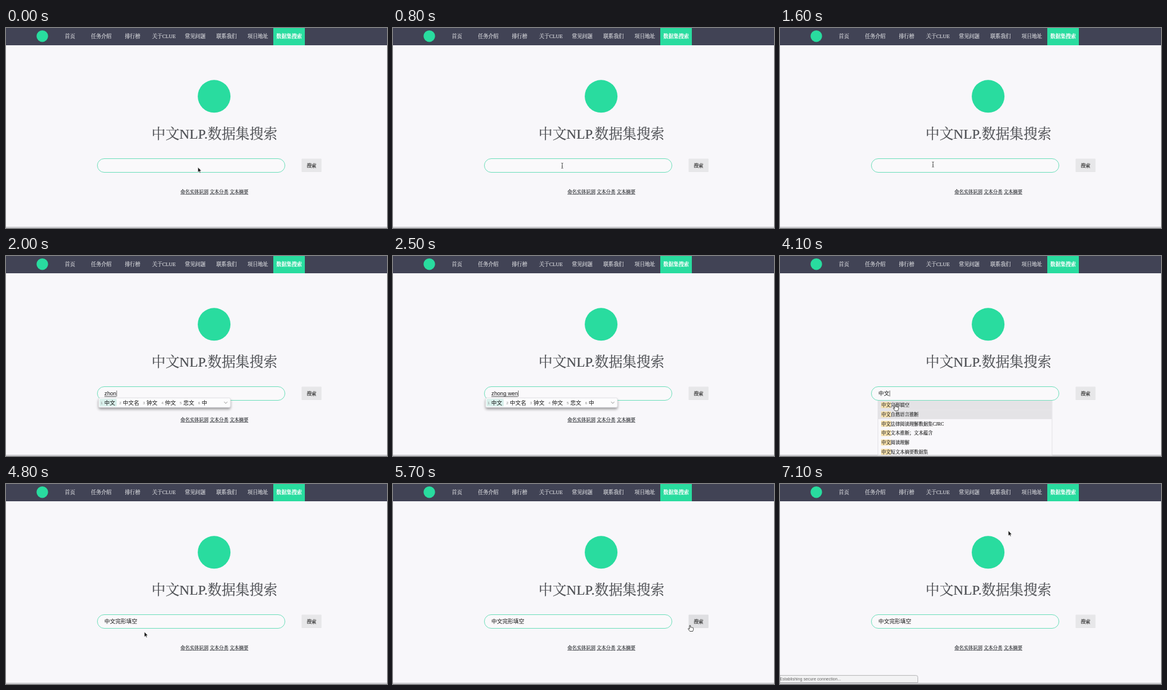
These frames come from a looping animation (640x336 px, 8 s). An HTML page:

```html
<!DOCTYPE html>
<html lang="zh-CN">
<head>
<meta charset="utf-8">
<title>数据集搜索</title>
<style>
  html, body { margin: 0; width: 100%; height: 100%; overflow: hidden; background: #f8f7fa; }
  svg { display: block; width: 100vw; height: 100vh; }
  text { white-space: pre; }
  .serif { font-family: "Liberation Serif", "Noto Serif CJK SC", "Noto Sans CJK SC", serif; fill: currentColor; }
  .sans { font-family: "Liberation Sans", "Noto Sans CJK SC", sans-serif; }
  /* a hairline outline gives the serif text a medium weight */
  text.serif, .serif text { fill: currentColor; stroke: currentColor; stroke-width: .22; }
  .mid { text-anchor: middle; }
</style>
</head>
<body>
<svg id="stage" viewBox="0 0 640 336">
  <defs>
    <filter id="shadow" x="-10%" y="-50%" width="120%" height="250%">
      <feDropShadow dx="0" dy="3" stdDeviation="2.2" flood-color="#000" flood-opacity=".38"/>
    </filter>
  </defs>
  <rect width="640" height="336" fill="#f8f7fa"/>
  <rect width="640" height="29" fill="#414355"/>
  <rect x="449" width="53" height="29" fill="#29dc9f"/>
  <circle cx="61" cy="13.7" r="9.7" fill="#29dc9f"/>
  <g id="nav" class="serif mid" font-size="8.6" color="#d6d7db"></g>

  <circle cx="349.6" cy="114.8" r="27.5" fill="#29dc9f"/>
  <text class="serif" x="244.6" y="186" font-size="23.4" color="#505256">中文NLP.数据集搜索</text>
  <g id="links" class="serif" font-size="7.85" color="#33363a"></g>

  <rect id="button" x="496.5" y="219.5" width="33.5" height="22.5" rx="1" fill="#e7e7e9"/>
  <text class="serif mid" x="513.2" y="233.8" font-size="8" color="#333">搜索</text>
  <rect x="153.5" y="219.5" width="315" height="23" rx="11.5" fill="#faf9fb" stroke="#5fdcb4" stroke-width=".9"/>
  <rect y="334" width="640" height="1.5" fill="#bcbcc0"/>

  <g id="list" class="serif" font-size="7.85" color="#333">
    <rect x="164.5" y="243.3" width="292.5" height="91" fill="#f9f8fb" stroke="#dcdce0" stroke-width=".8"/>
  </g>

  <text id="query" class="sans" x="165.3" y="234.4" font-size="9.2" fill="#111"></text>
  <rect id="underline" x="165.3" y="235.6" height=".8" fill="#222"/>
  <rect id="caret" y="226" width=".8" height="10" fill="#555"/>

  <g id="popup" class="sans">
    <rect x="155.5" y="238.3" width="221.5" height="16" rx="2.5" fill="#fcfcfd" stroke="#c4c4c8" stroke-width=".5" filter="url(#shadow)"/>
    <rect x="157" y="240" width="29" height="12.6" rx="1.5" fill="#d8f0eb"/>
    <path d="M366.3 245l2.8 2.6 2.8-2.6" fill="none" stroke="#777" stroke-width=".8"/>
  </g>

  <g id="status">
    <path d="M0 321.6H228.5Q231.5 321.6 231.5 324.6V333.6H0Z" fill="#f3f3f4" stroke="#a5a5a8" stroke-width=".8"/>
    <text class="sans" x="-.5" y="330" font-size="7.05" fill="#666">Establishing secure connection...</text>
  </g>

  <g id="cursor">
    <path id="arrow" d="M0 0V8.4L2 6.6 3.3 9.5 4.6 8.9 3.3 6.1H5.8Z" fill="#111" stroke="#fff" stroke-width=".5"/>
    <path id="beam" d="M-1.6-4.4Q0-4.4 0-3.4 0-4.4 1.6-4.4M0-3.6V3.6M-1.6 4.4Q0 4.4 0 3.4 0 4.4 1.6 4.4M-.9.9H.9" fill="none" stroke="#333" stroke-width=".8"/>
    <path id="hand" d="M-1.4 5V.3Q-.6-.7.3.3V3.4Q1.3 2.7 2 3.7 3 3 3.7 4 5 3.5 5.1 5V7.2L4 10H-.8L-3.8 6Q-3.6 4.5-2.3 5.3L-1.4 6.4Z" fill="#fff" stroke="#222" stroke-width=".8" stroke-linejoin="round"/>
  </g>
</svg>
<script>
const $ = id => document.getElementById(id);
const LOOP = 8000, STEP = 100;

function add(parent, tag, attrs, text = '') {
  const el = document.createElementNS('http://www.w3.org/2000/svg', tag);
  for (const key in attrs) el.setAttribute(key, attrs[key]);
  el.textContent = text;
  return parent.appendChild(el);
}

['首页', '任务介绍', '排行榜', '关于CLUE', '常见问题', '联系我们', '项目地址', '数据集搜索'].forEach((label, i) =>
  add($('nav'), 'text', {
    x: 107.4 + i * 52.6, y: 17.2,
    ...(i === 7 && { color: '#fff', 'font-weight': 700 })
  }, label));

[['命名实体识别', 293], ['文本分类', 342.2], ['文本摘要', 375.7]].forEach(([label, x]) => {
  add($('links'), 'text', { x, y: 278 }, label);
  add($('links'), 'rect', { x, y: 278.9, width: label.length * 7.85, height: .7 });
});

const ROW = 15.7;
const hovers = [0, 1].map(i =>
  add($('list'), 'rect', { x: 165, y: 243.5 + i * 15.3, width: 291.6, height: 15.3, fill: '#e4e3e6' }));
['完形填空', '自然语言推断', '法律阅读理解数据集CJRC', '文本推断；文本蕴含', '阅读理解', '短文本摘要数据集'].forEach((rest, i) => {
  const y = 253.2 + i * ROW;
  add($('list'), 'rect', { x: 169.8, y: y - 7.8, width: 16.4, height: 10, fill: '#f6e0ab' });
  add($('list'), 'text', { x: 170.2, y }, '中文' + rest);
});

[['中文', 159], ['中文名', 190.3], ['钟文', 230], ['仲文', 261], ['忠文', 291.8], ['中', 322.8]].forEach(([word, x], i) => {
  add($('popup'), 'text', { x, y: 248.8, 'font-size': 6.2, fill: '#888' }, i + 1);
  add($('popup'), 'text', { x: x + 6, y: 249.8, 'font-size': 9.2, fill: '#111' }, word);
});

// start time, text
const typed = [
  [0, ''], [1700, 'z'], [1800, 'zh'], [1900, 'zho'], [2000, 'zhon'], [2100, 'zhong'],
  [2200, 'zhong w'], [2300, 'zhong we'], [2400, 'zhong wen'], [2700, '中文'], [4200, '中文完形填空']
];
// time, x, y of the pointer's hot spot
const path = [
  [0, 322.4, 234], [300, 322.4, 234], [1200, 257, 229.3], [3000, 257, 229.3], [3200, 239, 231.5],
  [3400, 239, 231.5], [3900, 194, 250], [4600, 194, 250], [5500, 498.5, 238], [5700, 499.5, 237.5],
  [6400, 499.5, 237.5], [6800, 385, 82], [7000, 383.6, 78.6]
];
// start time, pointer shape
const shapes = [
  [0, 'arrow'], [100, 'beam'], [1700, ''], [3000, 'beam'], [3700, 'hand'],
  [4200, 'arrow'], [5500, 'hand'], [6500, 'arrow']
];

const at = (table, t) => table.findLast(row => row[0] <= t);
const within = (t, from, to) => t >= from && t < to;
const show = (el, on) => el.setAttribute('visibility', on ? 'inherit' : 'hidden');

function pointer(t) {
  const a = at(path, t), b = path[path.indexOf(a) + 1] || a;
  const p = b === a ? 0 : (t - a[0]) / (b[0] - a[0]);
  const k = p * p * (3 - 2 * p);
  return [1, 2].map(i => a[i] + (b[i] - a[i]) * k);
}

function draw(t) {
  const text = at(typed, t)[1], composing = within(t, 1700, 2700);
  const query = $('query');
  if (query.textContent !== text) query.textContent = text;
  const width = text ? query.getComputedTextLength() : 0;

  $('underline').setAttribute('width', width);
  $('caret').setAttribute('x', 165.6 + width);
  show($('underline'), composing);
  show($('caret'), within(t, 1700, 4200));
  show($('popup'), composing);
  show($('list'), within(t, 2800, 4200));
  for (const row of hovers) show(row, within(t, 3700, 4200));
  show($('status'), t >= 6300);
  $('button').setAttribute('fill', within(t, 5500, 6500) ? '#dfdfe2' : '#e7e7e9');

  $('cursor').setAttribute('transform', `translate(${pointer(t)})`);
  for (const name of ['arrow', 'beam', 'hand']) show($(name), at(shapes, t)[1] === name);
}

const start = performance.now();
function tick() {
  const t = (performance.now() - start) % LOOP;
  draw(Math.floor(t / STEP) * STEP);
  requestAnimationFrame(tick);
}
tick();
</script>
</body>
</html>
```
